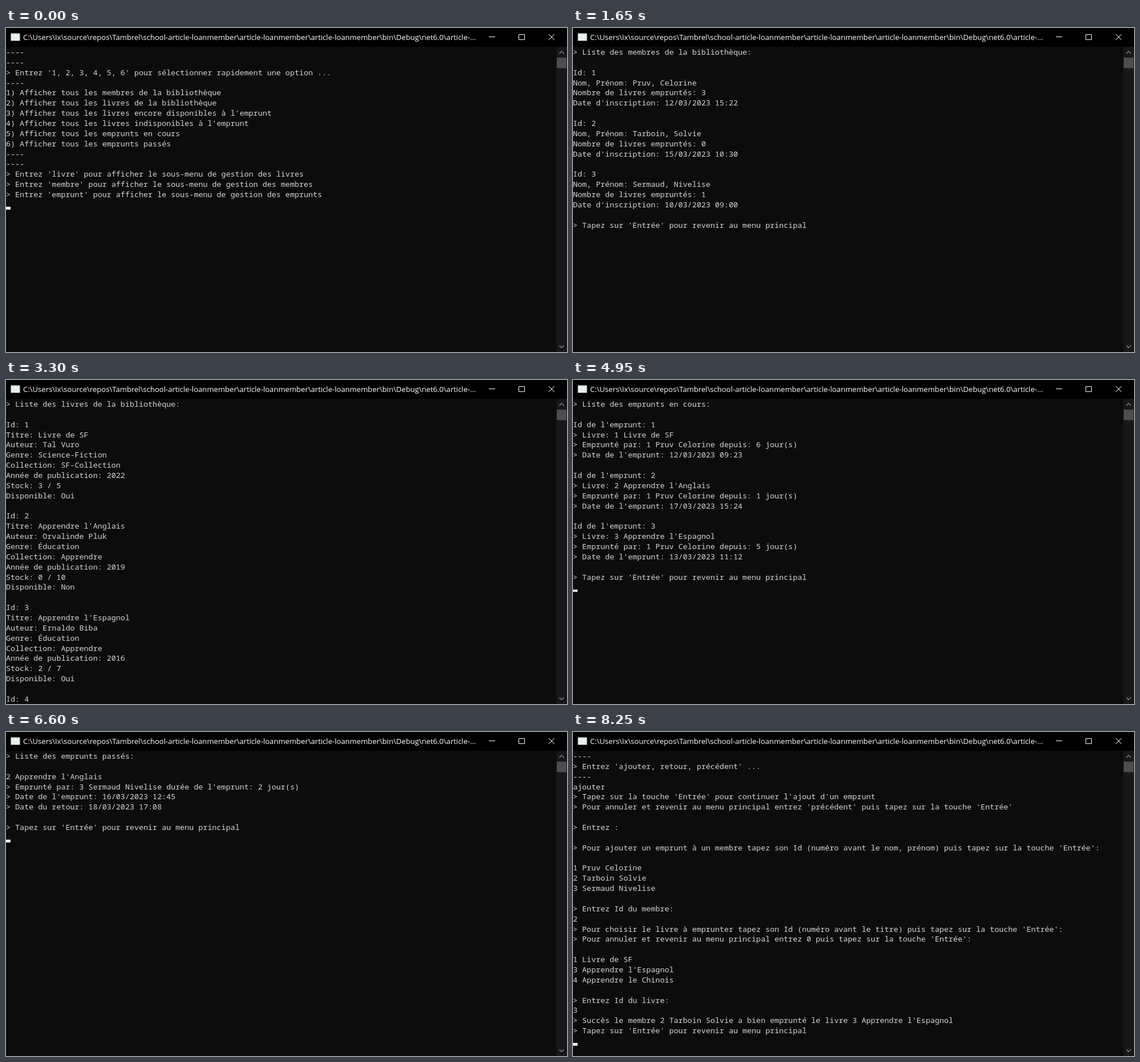
Write an HTML page that moves like this. It is 984 px wide and 569 px high and loops after 9.9 s.

```html
<!DOCTYPE html>
<html lang="fr">
<head>
<meta charset="utf-8">
<title>Console</title>
<style>
  html, body { margin: 0; width: 100%; height: 100%; overflow: hidden; background: #0c0c0c; }
  body { position: relative; }
  svg { position: absolute; left: 0; top: 0; }
  .title { font: 13.09px "Open Sans", sans-serif; fill: #fff; }
  pre {
    position: absolute; left: 0; top: 34px; margin: 0;
    font: 13.4px/17.86px "Noto Sans Mono", monospace;
    color: #d6d6d6;
    visibility: hidden;
    animation: screen 9.9s step-end infinite;
    animation-delay: calc(var(--n) * 1.65s);
  }
  .cursor { display: inline-block; width: 8px; height: 4.5px; vertical-align: -3.9px; background: #f2f2f2; }
  @keyframes screen {
    0% { visibility: visible; }
    16.6667%, 100% { visibility: hidden; }
  }
</style>
</head>
<body>
<svg width="984" height="569" fill="none">
  <path d="M0 0H984V33H0Z" fill="#000"/>
  <rect x="8.5" y="9.5" width="16" height="13" fill="#e6eeee"/>
  <text class="title" x="30" y="21.3">C:\Users\Ix\source\repos\Tambrel\school-article-loanmember\article-loanmember\article-loanmember\bin\Debug\net6.0\article-...</text>
  <path d="M847 15.5H858M899.5 11.5H909.5V20.5H899.5ZM952 11L962 21M962 11L952 21" stroke="#fff"/>
  <path d="M965 33H984V569H965Z" fill="#171717"/>
  <path d="M966 52H983V70.5H966Z" fill="#4d4d4d"/>
  <path d="M970.5 45L974.5 41L978.5 45M970.5 557.5L974.5 561.5L978.5 557.5" stroke="#868686" stroke-width="1.4"/>
</svg>

<pre style="--n:0">
----
----
> Entrez '1, 2, 3, 4, 5, 6' pour sélectionner rapidement une option ...
----
1) Afficher tous les membres de la bibliothèque
2) Afficher tous les livres de la bibliothèque
3) Afficher tous les livres encore disponibles à l'emprunt
4) Afficher tous les livres indisponibles à l'emprunt
5) Afficher tous les emprunts en cours
6) Afficher tous les emprunts passés
----
----
> Entrez 'livre' pour afficher le sous-menu de gestion des livres
> Entrez 'membre' pour afficher le sous-menu de gestion des membres
> Entrez 'emprunt' pour afficher le sous-menu de gestion des emprunts
<i class="cursor"></i></pre>

<pre style="--n:1">
> Liste des membres de la bibliothèque:

Id: 1
Nom, Prénom: Pruv, Celorine
Nombre de livres empruntés: 3
Date d'inscription: 12/03/2023 15:22

Id: 2
Nom, Prénom: Tarboin, Solvie
Nombre de livres empruntés: 0
Date d'inscription: 15/03/2023 10:30

Id: 3
Nom, Prénom: Sermaud, Nivelise
Nombre de livres empruntés: 1
Date d'inscription: 10/03/2023 09:00

> Tapez sur 'Entrée' pour revenir au menu principal</pre>

<pre style="--n:2">
> Liste des livres de la bibliothèque:

Id: 1
Titre: Livre de SF
Auteur: Tal Vuro
Genre: Science-Fiction
Collection: SF-Collection
Année de publication: 2022
Stock: 3 / 5
Disponible: Oui

Id: 2
Titre: Apprendre l'Anglais
Auteur: Orvalinde Pluk
Genre: Éducation
Collection: Apprendre
Année de publication: 2019
Stock: 0 / 10
Disponible: Non

Id: 3
Titre: Apprendre l'Espagnol
Auteur: Ernaldo Biba
Genre: Éducation
Collection: Apprendre
Année de publication: 2016
Stock: 2 / 7
Disponible: Oui

Id: 4</pre>

<pre style="--n:3">
> Liste des emprunts en cours:

Id de l'emprunt: 1
> Livre: 1 Livre de SF
> Emprunté par: 1 Pruv Celorine depuis: 6 jour(s)
> Date de l'emprunt: 12/03/2023 09:23

Id de l'emprunt: 2
> Livre: 2 Apprendre l'Anglais
> Emprunté par: 1 Pruv Celorine depuis: 1 jour(s)
> Date de l'emprunt: 17/03/2023 15:24

Id de l'emprunt: 3
> Livre: 3 Apprendre l'Espagnol
> Emprunté par: 1 Pruv Celorine depuis: 5 jour(s)
> Date de l'emprunt: 13/03/2023 11:12

> Tapez sur 'Entrée' pour revenir au menu principal
<i class="cursor"></i></pre>

<pre style="--n:4">
> Liste des emprunts passés:

2 Apprendre l'Anglais
> Emprunté par: 3 Sermaud Nivelise durée de l'emprunt: 2 jour(s)
> Date de l'emprunt: 16/03/2023 12:45
> Date du retour: 18/03/2023 17:08

> Tapez sur 'Entrée' pour revenir au menu principal
<i class="cursor"></i></pre>

<pre style="--n:5">
----
> Entrez 'ajouter, retour, précédent' ...
----
ajouter
> Tapez sur la touche 'Entrée' pour continuer l'ajout d'un emprunt
> Pour annuler et revenir au menu principal entrez 'précédent' puis tapez sur la touche 'Entrée'

> Entrez :

> Pour ajouter un emprunt à un membre tapez son Id (numéro avant le nom, prénom) puis tapez sur la touche 'Entrée':

1 Pruv Celorine
2 Tarboin Solvie
3 Sermaud Nivelise

> Entrez Id du membre:
2
> Pour choisir le livre à emprunter tapez son Id (numéro avant le titre) puis tapez sur la touche 'Entrée':
> Pour annuler et revenir au menu principal entrez 0 puis tapez sur la touche 'Entrée':

1 Livre de SF
3 Apprendre l'Espagnol
4 Apprendre le Chinois

> Entrez Id du livre:
3
> Succès le membre 2 Tarboin Solvie a bien emprunté le livre 3 Apprendre l'Espagnol
> Tapez sur 'Entrée' pour revenir au menu principal
<i class="cursor"></i></pre>
</body>
</html>
```
